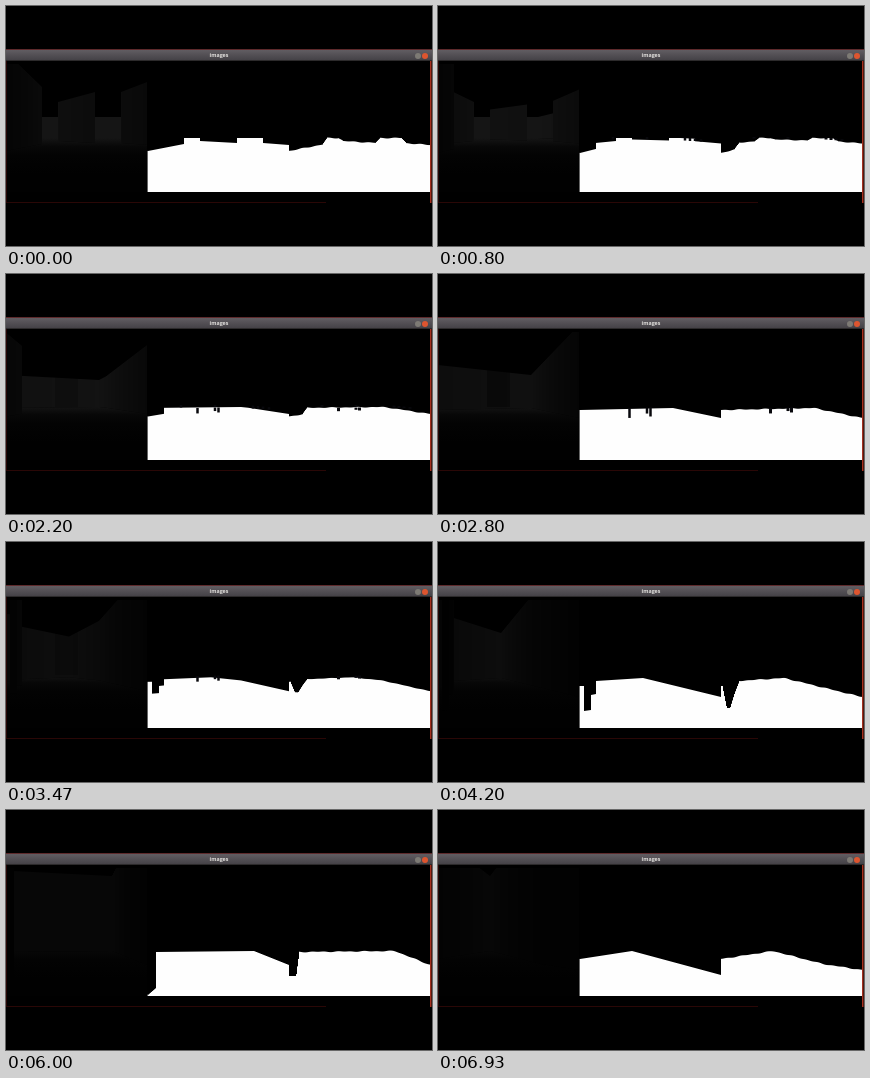
An HTML page with a canvas that plays this animation: 426x240 px, repeating every 6.99 s.

```html
<!DOCTYPE html>
<html lang="en">
<head>
<meta charset="utf-8">
<title>images</title>
<style>
  html, body { margin: 0; width: 100%; height: 100%; overflow: hidden; background: #000; }
  #stage { position: relative; width: 426px; height: 240px; overflow: hidden; background: #000; }
  canvas { position: absolute; left: 0; top: 0; }
  #bar {
    position: absolute; left: 0; top: 43px; width: 426px; height: 12px; box-sizing: border-box;
    border-top: 1px solid #5e2a2c; border-bottom: 1px solid #2c2a2b;
    background: linear-gradient(#615d62, #454247);
    color: #e4e2df; text-align: center;
    font: bold 5.3px/11px "Open Sans", "Noto Sans", sans-serif;
  }
  #bar i { position: absolute; top: 2.5px; width: 6px; height: 6px; border-radius: 50%; background: #7d7a74; }
  #bar i.close { background: #dd552f; }
</style>
</head>
<body>
<div id="stage">
  <canvas id="view" width="426" height="240"></canvas>
  <div id="bar">images<i style="left:408.5px"></i><i class="close" style="left:416px"></i></div>
</div>
<script>
const LOOP = 6990, STEP = 1000 / 15, STEPS = 105;
const TOP = 55, FAR = 132, FLOOR = 186, WIDTH = 141, TRUTH = 142, GUESS = 283;

// wall: where wall meets floor, shown in the middle panel;
// guess: the estimate on the right, when it strays from the wall;
// legs: x, length, lean; box: a dark piece of furniture
const scenes = [
  { at: 0, wall: [[0, 145], [36, 138], [36, 132], [52, 132], [52, 135], [89, 137],
                  [89, 132], [115, 132], [115, 137], [141, 139]] },
  { at: 24, wall: [[0, 149], [16, 144], [16, 132], [100, 132], [141, 136]],
    legs: [[33, 3], [67, 2], [105, 4], [110, 4], [115, 3], [121, 3]] },
  { at: 42, wall: [[0, 136], [93, 134], [141, 144]],
    legs: [[49.5, 9], [67, 5], [70.5, 8]], box: [49, 90, 23, 43] },
  { at: 63, wall: [[0, 144], [4, 144], [4, 169], [11, 168], [11, 153], [16, 152],
                   [16, 139], [63, 136], [141, 155]] },
  { at: 78, wall: [[0, 132], [141, 132]], guess: [[0, 132], [83, 132], [141, 160]],
    legs: [[37, 2], [66.5, 4], [88.5, 20], [93, 14], [122.5, 26, 6.5]], box: [41, 117, 18, 15] },
  { at: 90, wall: [[0, 185], [8, 178], [8, 142], [106, 141], [141, 155]] },
  { at: 104, wall: [[0, 149], [52, 141], [141, 165]], guess: [[0, 149], [52, 141], [102, 154], [141, 160]] }
];

const ctx = document.getElementById("view").getContext("2d");
const mix = (a, b, k) => a + (b - a) * k;
const clamp = (v, low, high) => Math.max(low, Math.min(high, v));
const columns = rule => Array.from({ length: WIDTH }, (_, x) => rule(x));

function heightAt(points, x) {
  const i = points.findIndex(p => p[0] > x);
  const [x0, y0] = points[i - 1], [x1, y1] = points[i];
  return mix(y0, y1, (x - x0) / (x1 - x0));
}

// The estimate is a softened, slightly wavy copy of the outline.
function soften(line, seed) {
  return columns(x => {
    let sum = 0;
    for (let d = -2; d <= 2; d++) sum += line[clamp(x + d, 0, WIDTH - 1)];
    const wave = 0.5 * Math.sin(x * 0.37 + seed) * Math.sin(x * 0.11);
    return Math.min(sum / 5 + wave, 166);
  });
}

for (const s of scenes) {
  const sample = points => columns(x => heightAt(points, x + 0.5));
  s.truth = sample(s.wall);
  s.room = sample(s.guess || s.wall);
  s.soft = soften(s.room, s.at);
}

const blend = (a, b, k) => a.map((y, x) => mix(y, b[x], k));

// Surfaces darken the nearer they are, and near ones stand lower on screen.
function shade(y) {
  const v = Math.round(1 + 20 * 0.88 ** (y - FAR));
  return `rgb(${v},${v},${v})`;
}

const floorShade = ctx.createLinearGradient(0, FAR, 0, FLOOR);
for (let i = 0; i <= 6; i++) floorShade.addColorStop(i / 6, shade(mix(FAR, FLOOR, i / 6)));

function drawDepth(room) {
  room.forEach((y, x) => {
    const top = Math.max(TOP + 3, 111 - 5 * (y - FAR));
    ctx.fillStyle = shade(y);
    ctx.fillRect(x, top, 1, y - top);
    ctx.fillStyle = floorShade;
    ctx.fillRect(x, y, 1, FLOOR - y);
  });
}

function drawMask(line, left) {
  ctx.fillStyle = "#fefefe";
  line.forEach((y, x) => ctx.fillRect(left + x, y, 1, FLOOR - y));
}

function drawLegs(scene, weight, left, reach, width) {
  ctx.lineWidth = width;
  for (const [x, length, lean = 0] of scene.legs || []) {
    const y = scene.truth[Math.floor(x)];
    const k = weight * reach(length) / length;
    ctx.beginPath();
    ctx.moveTo(left + x, y - 1);
    ctx.lineTo(left + x + lean * k, y + length * k);
    ctx.stroke();
  }
}

function drawBorder() {
  ctx.fillStyle = "#2a0706";
  ctx.fillRect(0, TOP, 1, 142);
  ctx.fillRect(0, 196, 320, 1);
  ctx.fillStyle = "#a5301f";
  ctx.fillRect(424, TOP, 1.5, 142);
}

function draw(time) {
  const step = Math.min(STEPS - 1, Math.floor((time % LOOP + 5) / STEP));
  const next = Math.max(1, scenes.findIndex(s => s.at >= step));
  const a = scenes[next - 1], b = scenes[next];
  const k = (step - a.at) / (b.at - a.at);
  const truth = blend(a.truth, b.truth, k);

  ctx.fillStyle = "#000";
  ctx.fillRect(0, 0, 426, 240);
  drawDepth(blend(a.room, b.room, k));
  drawMask(truth, TRUTH);
  drawMask(blend(a.soft, b.soft, k), GUESS);
  ctx.fillStyle = "#666";
  ctx.fillRect(TRUTH - 1, truth[0], 1, FLOOR - truth[0]);

  ctx.strokeStyle = "#08080c";
  for (const [scene, weight] of [[a, 1 - k], [b, k]]) {
    if (!weight) continue;
    drawLegs(scene, weight, TRUTH, h => h, 2.5);
    drawLegs(scene, weight, GUESS, h => Math.min(5, h / 2), 3);
    if (scene.box) {
      ctx.fillStyle = `rgba(0,0,0,${0.4 * weight})`;
      ctx.fillRect(...scene.box);
    }
  }
  drawBorder();
}

const start = performance.now();
function tick() {
  draw(performance.now() - start);
  requestAnimationFrame(tick);
}
tick();
</script>
</body>
</html>
```
